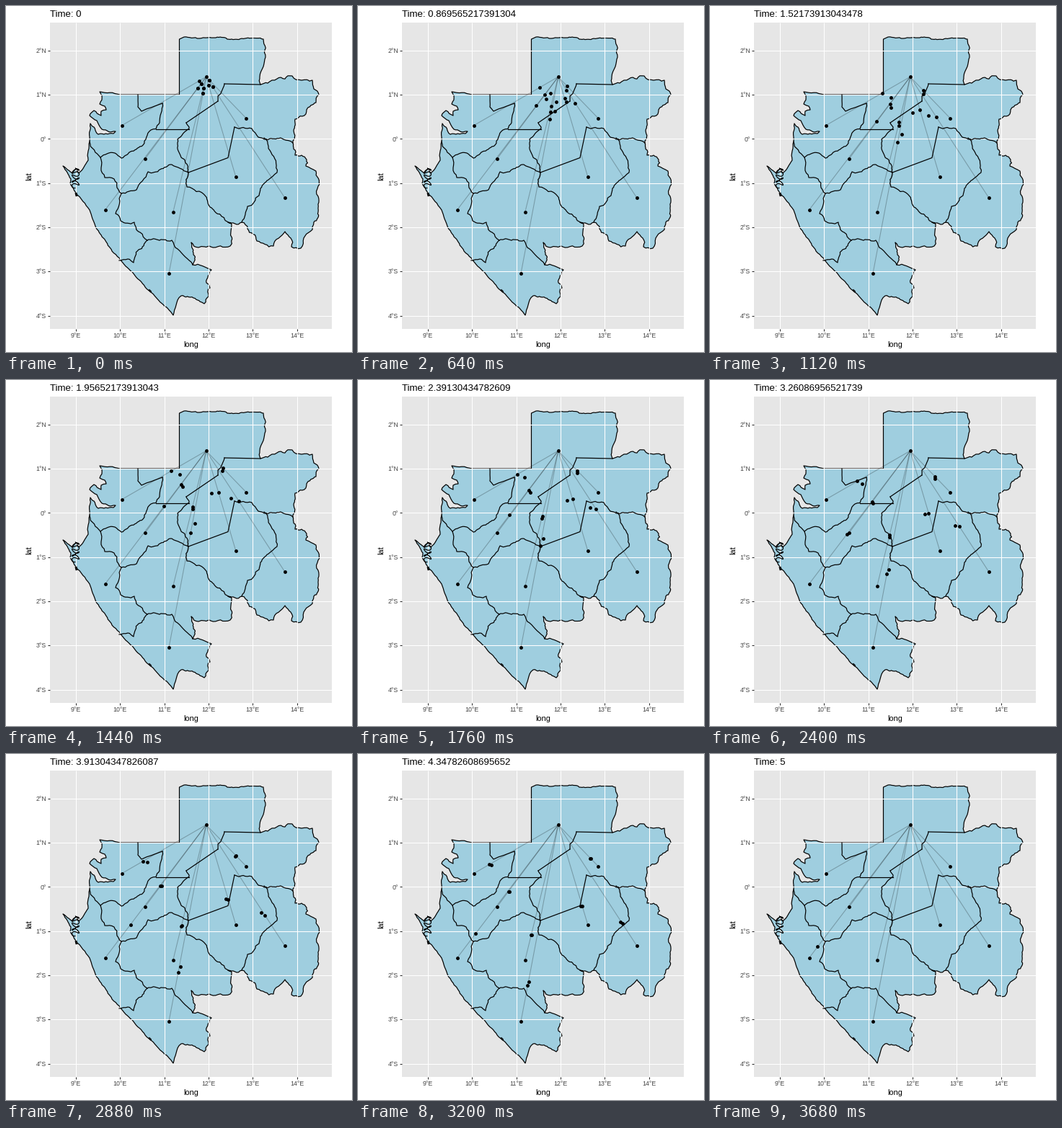
These frames come from a looping animation (480 px wide and 480 px high, 3840 ms). A matplotlib script:

```python
import numpy as np
import matplotlib.pyplot as plt
from matplotlib.animation import FuncAnimation

SIZE, DPI = 480, 80
PT = 72 / DPI  # points per pixel
FRAMES, INTERVAL = 24, 160
LAST = FRAMES - 1
STEP = 61.3  # pixels per degree
LAND, PANEL = "#9fcedf", "#e6e6e6"
TICK, GREY = "#2b2b2b", "#444444"

plt.rcParams["font.family"] = "Liberation Sans"
rng = np.random.default_rng(7)


def split(a, b, amount):
    """Fractal line from a to b, without its start."""
    d = b - a
    size = np.hypot(*d)
    if size < 4:
        return [b]
    shift = np.clip(rng.normal(0, amount), -1.6 * amount, 1.6 * amount)
    mid = (a + b) / 2 + shift * min(1, 14 / size) * np.array([-d[1], d[0]])
    return split(a, mid, amount) + split(mid, b, amount)


def rough(*points, amount=0.1):
    pts = np.array(points, float)
    out = [pts[0]]
    for a, b in zip(pts[:-1], pts[1:]):
        out += split(a, b, amount)
    return np.array(out)


fig = plt.figure(figsize=(SIZE / DPI, SIZE / DPI), dpi=DPI, facecolor="white")
ax = fig.add_axes([0, 0, 1, 1])
ax.set(xlim=(0, SIZE), ylim=(SIZE, 0))
ax.axis("off")


def line(xs, ys, color="black", width=1.07, **kw):
    ax.plot(xs, ys, color=color, lw=width * PT, **kw)


def label(x, y, s, size, color="black", **kw):
    return ax.text(x, y, s, fontsize=size * PT, color=color, **kw)


def border(*points, amount=0.1):
    line(*rough(*points, amount=amount).T, width=1.2)


# Panel, grid and axes
ax.add_patch(plt.Rectangle((61, 23), 391, 425, color=PANEL, lw=0))
for k in range(6):
    x = 97 + STEP * k
    line([x, x], [23, 448], "white", solid_capstyle="butt")
    line([x, x], [448, 450.7], TICK, solid_capstyle="butt")
    label(x, 460, f"{9 + k}°E", 8.8, GREY, ha="center", va="baseline")
for lat in range(-4, 3):
    y = 184.4 - STEP * lat
    line([61, 452], [y, y], "white", solid_capstyle="butt")
    line([58.3, 61], [y, y], TICK, solid_capstyle="butt")
    side = "N" if lat > 0 else "S" if lat < 0 else ""
    label(56, y + 3.2, f"{abs(lat)}°{side}", 8.8, GREY, ha="right",
          va="baseline")
label(256.5, 473, "long", 11, ha="center", va="baseline")
label(32, 236, "lat", 11, ha="center", va="center", rotation=90)
title = label(61, 15, "", 13.2, va="baseline")

# Outline, clockwise from the inner corner in the north
north = rough(
    (240.5, 46), (247, 43), (268, 45), (291, 44), (323, 46.5), (357, 46),
    (360, 71), (357, 84), (352, 98), (353, 109), amount=0.08)
northeast = rough(
    (353, 109), (363, 107), (376, 101), (397, 97), (410, 103), (425, 103),
    (427, 115), (434, 123), (430, 134), (417, 144), (401, 157), (399, 173),
    (398, 190), amount=0.14)
east = rough(
    (398, 190), (401, 207), (417, 213), (416, 222), (430, 229), (433, 250),
    (433, 264), (433, 286), (427, 300), (413, 322), (409, 336), (396, 334),
    (395, 322), (387, 313), (371, 333), (348, 326), (335, 309), (327, 300),
    amount=0.14)
south = rough(
    (327, 300), (308, 300), (313, 303), (311, 333), (284, 334), (267, 335),
    (257, 328), (260, 345), (259, 359), (285, 366), (278, 384), (283, 391),
    (275, 413), (260, 405), (243, 402), (232, 429), amount=0.12)
coast = rough(
    (232, 429), (200, 396), (166, 361), (147, 340), (125, 308), (116, 283),
    (97, 259), (89, 246), (90, 240), (79, 222), (92, 232), (97, 226),
    (101, 232), (114, 214), (116, 188), amount=0.05)
northwest = rough(
    (116, 188), (117, 163), (128, 178), (149, 177), (152, 174), (133, 171),
    (126, 159), (116, 152), (122, 145), (132, 152), (132, 146), (139, 144),
    (137, 139), (130, 136), (133, 124), (130, 119), (158, 123), amount=0.08)
outline = np.vstack([north, northeast, east, south, coast, northwest,
                     [(240.5, 123)]])
ax.add_patch(plt.Polygon(outline, closed=True, facecolor=LAND,
                         edgecolor="black", lw=1.2 * PT, joinstyle="round"))

# Straight province borders
border((250, 162), (294, 132), amount=0)
border((208, 170.5), (254, 170.5), amount=0)
border((303, 108), (353, 109), amount=0)
border((253, 231), (308, 210.5), (317, 168), amount=0)
border((183, 123), (183, 140), (188, 146), (217, 135), amount=0.02)

# Winding province borders
border((303, 108), (294, 125), (294, 132))
border((250, 162), (254, 170), (238, 185), (240, 203), (253, 231))
border((217, 135), (213, 162), (208, 170.5), (201, 172), (190, 193),
       (160, 211), (151, 204), (131, 210))
border((116, 188), (131, 210), (137, 238), (150, 240), (154, 252), (160, 260))
border((160, 260), (181, 255), (197, 230), (230, 220), (253, 231))
border((160, 260), (152, 288), (159, 298), (178, 300), (186, 314), (196, 325))
border((157, 353), (169, 351), (177, 356), (184, 338), (196, 325), (230, 325),
       (238, 337), (259, 359))
border((317, 168), (341, 170), (350, 182), (385, 185), (398, 190))
border((358, 183), (376, 231), (353, 253), (351, 263), (335, 278), (327, 300))
border((253, 231), (251, 251), (277, 264), (283, 279), (308, 300))

# Lagoon and islets
u = np.linspace(0, 1, 60)
line(96.5 + 5 * np.sin(25 * u), 225 + 26 * u + 2 * np.sin(40 * u), width=1.2)
line([97.3, 97.8], [260.5, 262.5], width=3)
line([199, 200.5], [394.5, 396], width=2.5)

# Hub, towns and the trips between them
hub = np.array([277.7, 98.3])
towns = np.array([(160.5, 165.8), (193.3, 211.5), (137.6, 282.8),
                  (231.8, 285.8), (226, 371), (318.7, 236.6),
                  (386.5, 265.6), (333, 155.5)])
ODD = 2  # the one trip still visible at the end
first = hub + (towns - hub) / 12
final = hub + (towns - hub) * 11 / 12
# Crossing trips set out on one road and end on another
cross_from = first[[6, 3, 4, 7, 2, 1, 5]]
cross_to = np.delete(final, ODD, axis=0)
KEYS = [0, 5, 9, 14, 18, LAST]


def dots(points):
    return ax.scatter(*np.transpose(points), s=(4.9 * PT) ** 2, c="black",
                      lw=0, zorder=5)


for town in towns:
    line(*np.transpose([hub, town]), alpha=0.25)
dots(np.vstack([hub, towns]))
movers = dots(first)


def draw(i):
    title.set_text(f"Time: {5 * i / LAST:.15g}")
    if i == LAST:
        movers.set_offsets(final[[ODD]])
    else:
        along = np.interp(i, KEYS, range(6)) / 5
        roads = first + (final - first) * along
        cross = cross_from + (cross_to - cross_from) * i / LAST
        movers.set_offsets(np.vstack([roads, cross]))
    return title, movers


anim = FuncAnimation(fig, draw, frames=FRAMES, interval=INTERVAL,
                     repeat=True, repeat_delay=0)
plt.show()
```
